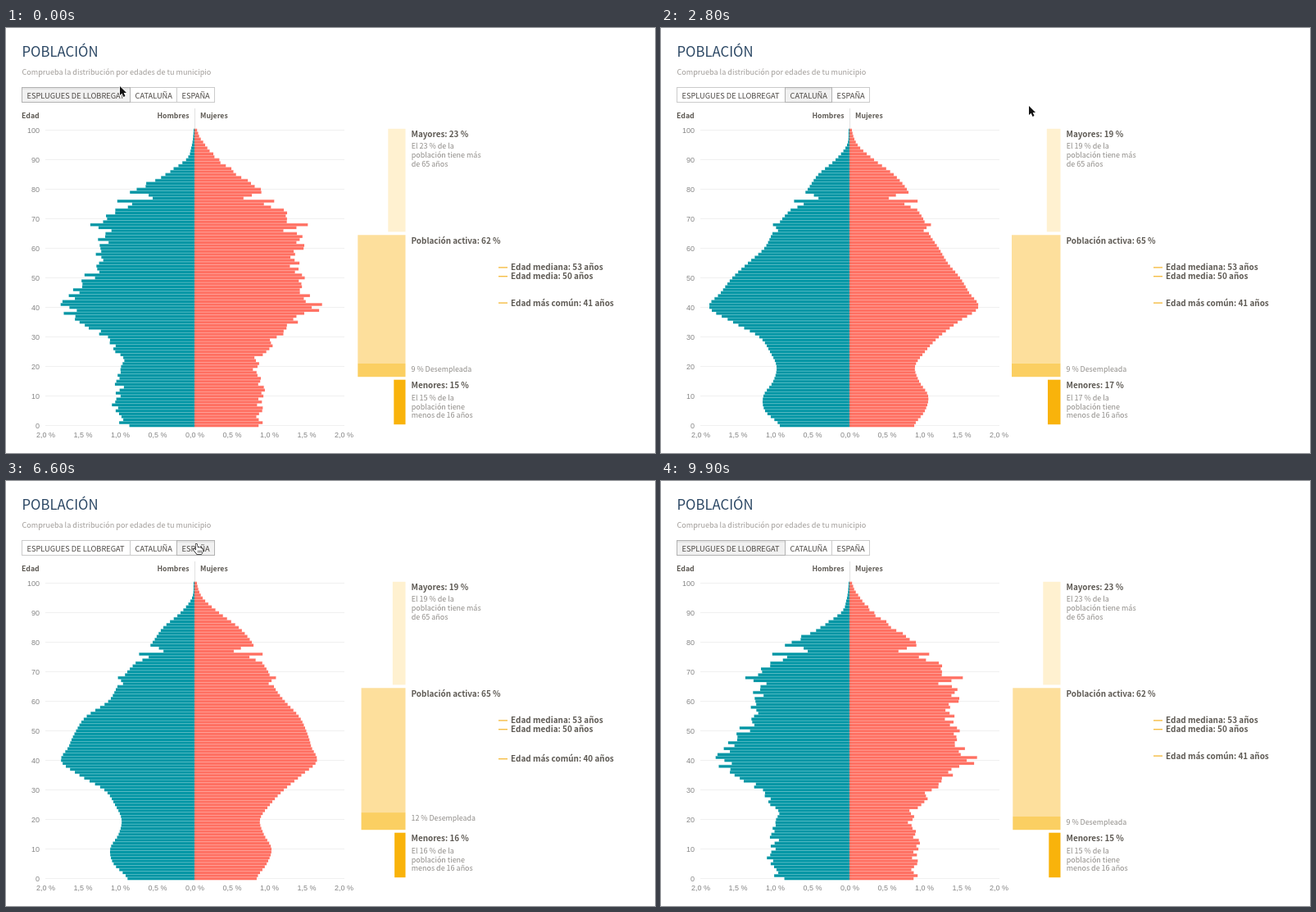
An HTML page with a canvas that plays this animation: 792 by 518 pixels, repeating every 10 s.

```html
<!DOCTYPE html>
<html lang="es">
<head>
<meta charset="utf-8">
<title>Población</title>
<style>
  html, body { margin: 0; width: 100%; height: 100%; overflow: hidden; background: #fff; }
  canvas { display: block; }
</style>
</head>
<body>
<canvas id="stage" width="792" height="518"></canvas>
<script>
const ctx = document.getElementById('stage').getContext('2d');
const LOOP = 10000, CENTRE = 230, STEP = 3.6, BASE = 484.5, KNOT = 5;
const SANS = '"Noto Sans CJK JP", "Noto Sans CJK SC", "Noto Sans CJK", sans-serif';
const ARIAL = '"Liberation Sans", Arial, sans-serif';
const TEAL = '#0095a4', CORAL = '#ff6f61', DARK = '#5e5a54', GREY = '#8f8c88';

const clamp = v => Math.min(1, Math.max(0, v));
const mix = (a, b, k) => a + (b - a) * k;
const cubic = v => v < 0.5 ? 4 * v ** 3 : 1 - 4 * (1 - v) ** 3;
const bell = (age, peak, spread) => Math.exp(-(((age - peak) / spread) ** 2));
const yOf = age => BASE - age * STEP;

function seeded(seed) {
  return () => (seed = (seed * 16807) % 2147483647) / 2147483647;
}

// Smooth curve through one width per five years of age.
function curve(knots) {
  return age => {
    const i = Math.min(Math.floor(age / KNOT), knots.length - 2);
    const k = age / KNOT - i;
    const b = knots[i], c = knots[i + 1];
    const a = knots[i - 1] ?? b, d = knots[i + 2] ?? c;
    return b + k / 2 * (c - a + k * (2 * a - 5 * b + 4 * c - d + k * (3 * (b - c) + d - a)));
  };
}

// Unusual birth years that show up in every population.
const cohorts = { 66: 0.95, 68: 1.07, 74: 0.93, 75: 0.86, 76: 1.09, 77: 0.64, 78: 0.77 };

function profile(shape, spread = 0, seed = 1) {
  const random = seeded(seed);
  return Array.from({ length: 101 }, (_, age) =>
    Math.max(0.5, shape(age)) * (cohorts[age] ?? 1) * (1 + spread * (2 * random() - 1)));
}

const regionMen = curve([85, 103, 105, 93, 89, 97, 110, 142, 171, 157, 143,
  124, 104, 94, 82, 65, 51, 38, 17, 3, 1]);
const regionWomen = curve([79, 92, 96, 85, 80, 92, 109, 132, 157, 146, 135,
  120, 109, 97, 90, 78, 70, 54, 30, 10, 3]);
const townMen = curve([85, 97, 96, 90, 87, 93, 107, 134, 156, 145, 129,
  116, 113, 112, 109, 88, 69, 36, 10, 3, 1]);
const townWomen = curve([84, 78, 82, 80, 73, 84, 102, 123, 146, 138, 128,
  125, 127, 123, 118, 95, 78, 54, 29, 13, 3]);

// The country has fewer children and forty-year-olds, and more people in their fifties.
const national = shape => age => shape(age) *
  (1 - 0.05 * bell(age, 41, 5) + 0.06 * bell(age, 55, 4) - 0.045 * bell(age, 3, 8));

const town = {
  men: profile(townMen, 0.07, 4021), women: profile(townWomen, 0.07, 977),
  left: { old: 466.3, active: 429.3, young: 473.3 }, idleTop: 409,
  old: 23, active: 62, idle: 9, young: 15, common: 41
};
const region = {
  men: profile(regionMen), women: profile(regionWomen),
  left: { old: 470.8, active: 428, young: 472 }, idleTop: 408.7,
  old: 19, active: 65, idle: 9, young: 17, common: 41
};
const country = {
  men: profile(national(regionMen)), women: profile(national(regionWomen)),
  left: { old: 472, active: 434.5, young: 474.5 }, idleTop: 403.3,
  old: 19, active: 65, idle: 12, young: 16, common: 40
};

const changes = [[0, town, town], [1630, town, region], [5930, region, country], [7805, country, town]];
const buttons = [
  { label: 'ESPLUGUES DE LLOBREGAT', x: 19.5, w: 132, on: t => t < 1600 || t >= 7750 },
  { label: 'CATALUÑA', x: 151.5, w: 57, on: t => t >= 1600 && t < 5850 },
  { label: 'ESPAÑA', x: 208.5, w: 46, on: t => t >= 5850 && t < 7750 }
];
const route = [
  [0, 139, 71], [300, 139, 71], [1250, 181, 83], [1700, 181, 83], [2000, 416, 45],
  [2400, 440, 60], [3800, 536, 432], [4300, 536, 432],
  [5700, 235, 83], [6500, 235, 83], [7500, 119, 85], [8950, 119, 85]
];

function rect(x, y, w, h, colour) {
  ctx.fillStyle = colour;
  ctx.fillRect(x, y, w, h);
}

function text(str, x, y, size, colour, { weight = 400, align = 'left', family = SANS } = {}) {
  ctx.font = `${weight} ${size}px ${family}`;
  ctx.textAlign = align;
  ctx.fillStyle = colour;
  ctx.fillText(str, x, y);
}

const bold = (str, x, y, size = 9.9, align = 'left') =>
  text(str, x, y, size, DARK, { weight: 600, align });

function paragraph(lines, y) {
  lines.forEach((line, i) => text(line, 494.7, y + i * 10.8, 8.97, GREY));
}

function drawHeader(t) {
  text('POBLACIÓN', 19.5, 35, 16.7, '#2a4663', {
    weight: 300, family: `"Noto Sans CJK JP Light", ${SANS}`
  });
  text('Comprueba la distribución por edades de tu municipio', 19.5, 57, 9.1, '#a09c98');
  const frame = ({ x, w }, colour) => {
    ctx.strokeStyle = colour;
    ctx.lineWidth = 1;
    ctx.strokeRect(x, 72.5, w, 18);
  };
  for (const button of buttons) {
    const active = button.on(t);
    rect(button.x, 72.5, button.w, 18, active ? '#f1f1f1' : '#ffffff');
    if (active) rect(button.x, 73, button.w, 2, '#e4e4e4');
    frame(button, '#cbcbcb');
    text(button.label, button.x + 6, 85.5, 9.25, '#4c4844');
  }
  buttons.filter(button => button.on(t)).forEach(button => frame(button, '#b2b2b2'));
  bold('Edad', 19, 110, 8.75);
  bold('Hombres', 223.5, 110, 8.7, 'right');
  bold('Mujeres', 237, 110, 8.7);
}

function drawPyramid(from, to, k) {
  const label = (str, x, y, align) => text(str, x, y, 9, '#858585', { align, family: ARIAL });
  for (let age = 0; age <= 100; age += 10) {
    rect(48, Math.floor(yOf(age)), 365, 1, '#f0f0f0');
    label(String(age), 41, yOf(age) + 3, 'right');
  }
  rect(230, 98, 1, 25, '#e2e2e2');
  for (let i = -4; i <= 4; i++) {
    const percent = Math.abs(i / 2).toFixed(1).replace('.', ',') + ' %';
    label(percent, CENTRE + 0.5 + i * 45.5, 499, 'center');
  }
  for (let age = 0; age <= 100; age++) {
    const y = yOf(age) - STEP / 2;
    const men = mix(from.men[age], to.men[age], k);
    const women = mix(from.women[age], to.women[age], k);
    rect(CENTRE - men, y, men, STEP, TEAL);
    rect(CENTRE, y, women, STEP, CORAL);
    rect(CENTRE - men, y, men + women, 0.6, 'rgba(255,255,255,0.45)');
  }
}

function drawGroups(from, to, slow, fast) {
  const block = (key, top, bottom, colour) => {
    const x = mix(from.left[key], to.left[key], slow);
    rect(x, top, 487.5 - x, bottom - top, colour);
  };
  const idleTop = mix(from.idleTop, to.idleTop, slow);
  block('old', 122.8, 248.4, '#fff1d0');
  block('active', 252.3, idleTop, '#fddf9c');
  block('active', idleTop, 425.2, '#fbcf62');
  block('young', 428.7, 483.2, '#f9b30b');

  bold(`Mayores: ${to.old} %`, 494.5, 133);
  paragraph([`El ${to.old} % de la`, 'población tiene más', 'de 65 años'], 147.3);
  bold(`Población activa: ${to.active} %`, 494.5, 262.5);
  text(`${to.idle} % Desempleada`, 494.5, idleTop + 10, 8.9, GREY);
  bold(`Menores: ${to.young} %`, 494.5, 439.3);
  paragraph([`El ${to.young} % de la`, 'población tiene', 'menos de 16 años'], 453.7);

  const marks = [['mediana', 53, 53], ['media', 50, 50],
    ['más común', to.common, mix(from.common, to.common, fast)]];
  for (const [name, age, place] of marks) {
    const y = yOf(place + 0.5);
    rect(601, y - 0.7, 11, 1.4, '#f5bd45');
    bold(`Edad ${name}: ${age} años`, 616, y + 3.5, 9.95);
  }
}

function shape(points, fill, line) {
  ctx.beginPath();
  points.forEach(([x, y]) => ctx.lineTo(x, y));
  ctx.closePath();
  ctx.lineJoin = 'round';
  ctx.lineWidth = 1.3;
  ctx.strokeStyle = line;
  ctx.stroke();
  ctx.fillStyle = fill;
  ctx.fill();
}

const pointers = {
  arrow: () => shape([[0, 0], [0, 11], [2.6, 8.7], [4.5, 13], [6.5, 12.1], [4.7, 8], [8, 8]], '#111', '#fff'),
  hand() {
    shape([[-3, -6], [-1.5, -6], [-0.5, -1.5], [1, -2.3], [2, -1.4], [3.5, -1.8], [4.3, -0.6],
      [5.7, 0], [5.5, 3], [4, 6], [-1.5, 6], [-5.8, 0.8], [-4.7, -0.3], [-2.6, 1.5]], '#fff', '#111');
    for (let i = 0; i < 3; i++) rect(-0.3 + i * 1.8, 1.5, 0.8, 3, '#333');
  },
  beam() {
    rect(-0.6, -4.5, 1.2, 9, '#222');
    for (const y of [-5.4, 4.4]) {
      rect(-2.6, y, 2, 1, '#222');
      rect(0.6, y, 2, 1, '#222');
    }
    rect(-1.8, 1.6, 3.6, 0.9, '#222');
  }
};

function drawPointer(t) {
  const i = route.findIndex(([time]) => time > t);
  if (i < 0) return;
  const [t0, x0, y0] = route[i - 1], [t1, x1, y1] = route[i];
  const k = cubic((t - t0) / (t1 - t0));
  const x = mix(x0, x1, k), y = mix(y0, y1, k);
  const overButton = x > 19 && x < 255 && y > 73 && y < 91;
  const overText = x > 494 && x < 580 && ((y > 124 && y < 171) || (y > 430 && y < 478));
  ctx.save();
  ctx.translate(x, y);
  pointers[overButton ? 'hand' : overText ? 'beam' : 'arrow']();
  ctx.restore();
}

function draw(now) {
  const t = now % LOOP;
  const [start, from, to] = changes.filter(([time]) => time <= t).pop();
  const fast = cubic(clamp((t - start) / 500));
  const slow = cubic(clamp((t - start) / 1000));
  // The captions still show the old figures at the instant of the click.
  rect(0, 0, 792, 518, '#fff');
  drawHeader(t);
  drawPyramid(from, to, fast);
  drawGroups(from, to, slow, fast);
  drawPointer(t);
}

const begin = performance.now();
function tick() {
  draw(performance.now() - begin);
  requestAnimationFrame(tick);
}
tick();
</script>
</body>
</html>
```
